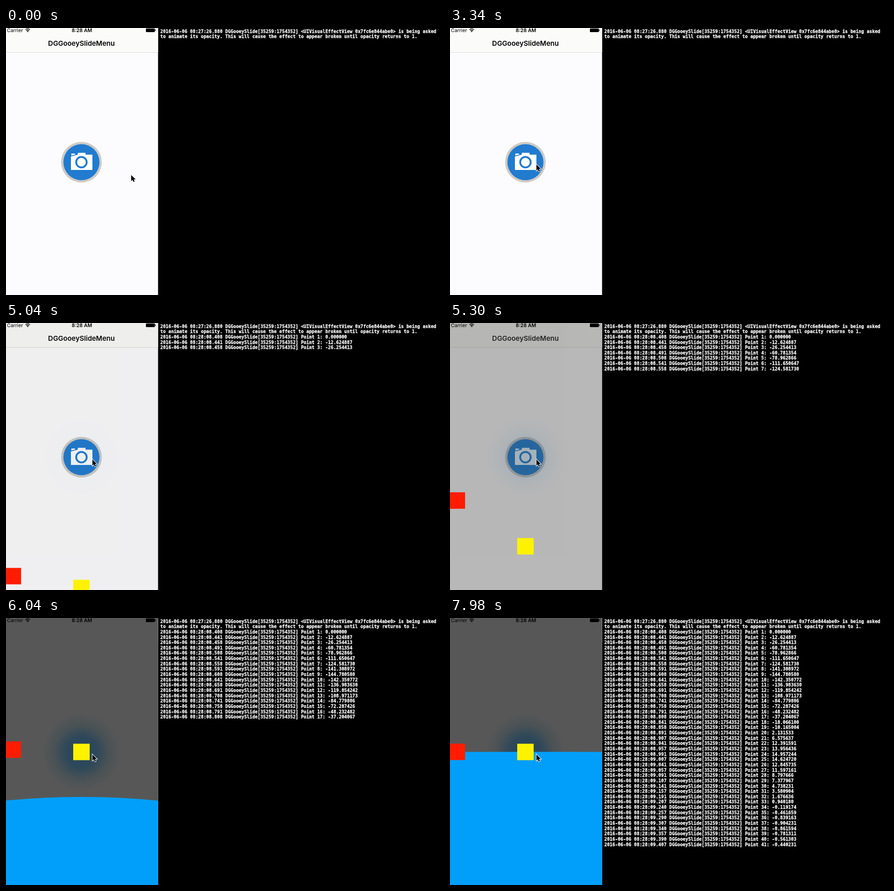
An HTML page that plays this animation: 958 by 585 pixels, repeating every 8 s.

```html
<!DOCTYPE html>
<html lang="en">
<head>
<meta charset="utf-8">
<title>Gooey slide menu</title>
<style>
  html, body { margin: 0; width: 100%; height: 100%; overflow: hidden; background: #000; }
  svg { display: block; width: 958px; height: 585px; }
  .ui { font-family: Inter, Roboto, sans-serif; fill: #000; }
  #log { font: bold 9.83px "DejaVu Sans Mono", monospace; fill: #fff; stroke: #fff; stroke-width: .3px; }
</style>
</head>
<body>
<svg viewBox="0 0 958 585">
  <defs>
    <clipPath id="screen"><rect width="332.6" height="585"/></clipPath>
    <radialGradient id="glow">
      <stop offset="0" stop-color="#22455f"/>
      <stop offset=".4" stop-color="#2e485a"/>
      <stop offset=".7" stop-color="#4a5255"/>
      <stop offset="1" stop-color="#575757"/>
    </radialGradient>
  </defs>
  <g clip-path="url(#screen)">
    <rect width="333" height="585" fill="#fcfcfe"/>
    <rect width="333" height="53" fill="#fbfbfa"/>
    <rect y="53" width="333" height="1" fill="#d8d8d0"/>
    <text class="ui" x="165" y="38.5" font-size="15" font-weight="600" text-anchor="middle">DGGooeySlideMenu</text>

    <circle cx="165" cy="294" r="44.5" fill="#cfcac5"/>
    <circle cx="165" cy="294" r="39.5" fill="#217bcf"/>
    <path d="M142 281.5L157 277.5V273.5H174V277.5H189V311H142ZM143 275H150L152 277L143 279.5Z" fill="#fff"/>
    <circle cx="165" cy="294" r="11.5" fill="#fff" stroke="#217bcf" stroke-width="4"/>
    <circle id="press" cx="165" cy="294" r="44.5" opacity=".48"/>

    <g id="overlay">
      <rect width="333" height="585" fill="#575757"/>
      <circle cx="165" cy="294" r="86" fill="url(#glow)"/>
    </g>

    <path id="menu" fill="#029ffa"/>
    <rect id="side" x="-3" width="36" height="36" fill="#ff1c00"/>
    <rect id="center" x="147" width="36" height="36" fill="#fff200"/>

    <g class="ui" font-size="10.8">
      <text x="2" y="8.5">Carrier</text>
      <text x="166" y="8.5" font-weight="600" text-anchor="middle">8:28 AM</text>
      <path d="M42.5 3.8Q47.5-.8 52.5 3.8M44.3 6Q47.5 3.2 50.7 6" fill="none" stroke="#000" stroke-width="1.5"/>
      <path d="M45.6 7.3Q47.5 5.8 49.4 7.3L47.5 9.2Z"/>
      <rect x="306" y="1" width="19.5" height="8" rx="1.5"/>
      <rect x="326" y="3.5" width="1.3" height="3"/>
    </g>
  </g>
  <g id="log"></g>
  <path id="cursor" d="M0 0V13.5L3.1 10.7L5.3 15.4L7.6 14.4L5.5 9.8H9.7Z" stroke="#fff" stroke-width="2" paint-order="stroke"/>
</svg>
<script>
const LOOP = 8000, TAP = 4870, LINES = 41;
const MIDDLE = 293.5, DROP = 315, PX_PER_POINT = 0.896;
const $ = id => document.getElementById(id);

const clamp = v => Math.min(1, Math.max(0, v));
const ease = v => (1 - Math.cos(Math.PI * clamp(v))) / 2;

const deviceClock = [[TAP, 0], [5300, 133], [6040, 460], [6740, 697], [LOOP, 1030]];
function deviceTime(t) {
  if (t <= TAP) return 0;
  const i = deviceClock.findIndex(([loopMs]) => loopMs >= t);
  const [t0, d0] = deviceClock[i - 1], [t1, d1] = deviceClock[i];
  return d0 + (d1 - d0) * (t - t0) / (t1 - t0);
}

// Damped spring from DROP to 0; frequency and decay are per second.
function spring(ms, frequency, decay) {
  const s = Math.max(0, ms) / 1000, phase = frequency * s;
  return DROP * Math.exp(-decay * s) * (Math.cos(phase) + decay / frequency * Math.sin(phase));
}
const sideOffset = ms => spring(ms, 10.83, 6.2);
const centerOffset = ms => spring(ms, 5.43, 7.24);
const gap = ms => sideOffset(ms) - centerOffset(ms);

function addLine(text) {
  const line = document.createElementNS('http://www.w3.org/2000/svg', 'text');
  line.setAttribute('x', 337.5);
  line.setAttribute('y', 10.6 + 11.643 * $('log').childElementCount);
  line.textContent = text;
  $('log').append(line);
  return line;
}

const PROCESS = 'DGGooeySlide[35259:1754352]';
addLine(`2016-06-06 08:27:26.880 ${PROCESS} <UIVisualEffectView 0x7fc6e844abe0> is being asked`);
addLine('to animate its opacity. This will cause the effect to appear broken until opacity returns to 1.');

// Two of every three display refreshes get logged.
const lines = Array.from({ length: LINES }, (_, i) => {
  const ms = Math.round(i * 1.5) * 16.65;
  const clock = (8.408 + ms / 1000).toFixed(3).padStart(6, '0');
  const value = (gap(ms) / PX_PER_POINT).toFixed(6);
  return addLine(`2016-06-06 08:28:${clock} ${PROCESS} Point ${i + 1}: ${value}`);
});

function draw(t) {
  const device = deviceTime(t);

  const glide = 1 - (1 - clamp(t / 800)) ** 2, nudge = ease((t - 2500) / 400);
  $('cursor').setAttribute('transform',
    `translate(${274 - 80 * glide - 5 * nudge} ${322 - 22 * glide - nudge})`);

  $('press').style.display = t >= 4400 && t < TAP ? '' : 'none';
  $('overlay').setAttribute('opacity', ease(device / 300));

  $('side').setAttribute('y', MIDDLE - 18 + sideOffset(device));
  $('center').setAttribute('y', MIDDLE - 18 + centerOffset(device));

  const edge = 700 - (700 - MIDDLE) * ease(device / 700);
  $('menu').setAttribute('d', `M-3 ${edge}Q165 ${edge + gap(device - 28)} 333 ${edge}V1000H-3Z`);

  const shown = Math.floor((t - TAP) / 71 + 1.1);
  lines.forEach((line, i) => line.style.display = i < shown ? '' : 'none');
}

const start = performance.now();
function frame() {
  draw((performance.now() - start) % LOOP);
  requestAnimationFrame(frame);
}
frame();
</script>
</body>
</html>
```
